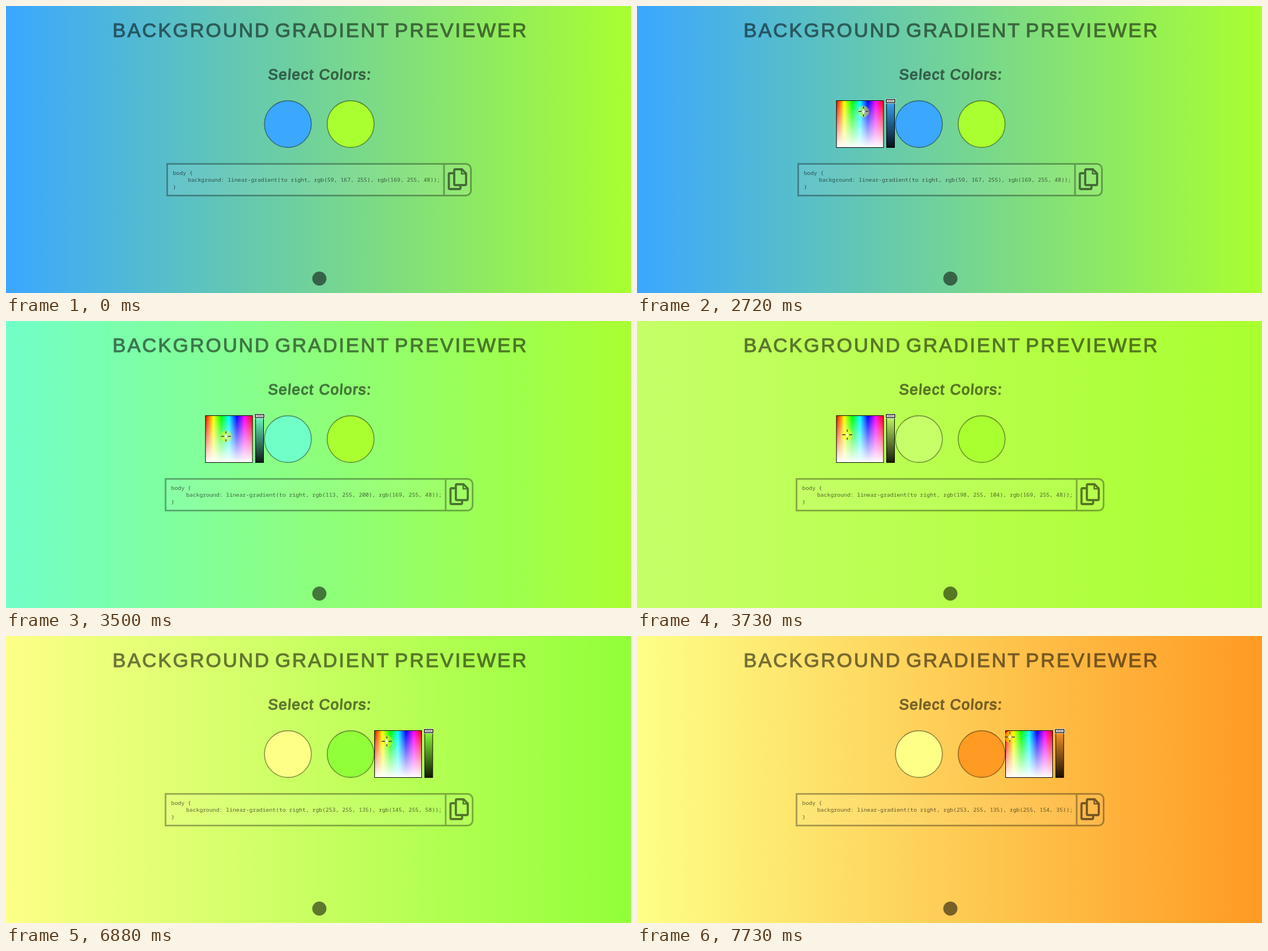
An HTML page for the animation above (8000 ms loop, 1103 by 508 pixels).

```html
<!DOCTYPE html>
<html lang="en">
<head>
<meta charset="utf-8">
<title>Background Gradient Previewer</title>
<style>
html, body { margin: 0; width: 1103px; height: 508px; overflow: hidden; }
svg { display: block; }
.heading { font-family: "Liberation Sans", Arial, sans-serif; font-kerning: none; fill: #000; stroke: #000; stroke-linejoin: round; opacity: .53; }
.title { font-size: 35px; letter-spacing: 2.8px; stroke-width: 1.1px; }
.subtitle { font-size: 26px; letter-spacing: 1.5px; stroke-width: 1.4px; }
.code { font: 9.77px "Noto Sans Mono", "DejaVu Sans Mono", monospace; fill-opacity: .6; white-space: pre; }
.frame { fill: none; stroke: #000; stroke-width: 3px; opacity: .32; }
.icon { fill: none; stroke: #000; stroke-width: 3.8px; opacity: .53; }
.swatch { stroke: #000; stroke-opacity: .42; stroke-width: 1.6px; }
.halo { fill: #ff0; fill-opacity: .45; }
.light { fill: none; stroke: #fff; stroke-width: 3px; }
.dark { fill: none; stroke: #111; stroke-width: 1.3px; }
.pointer { fill: #fff; stroke: #000; stroke-width: 1px; stroke-linejoin: round; }
</style>
</head>
<body>
<svg id="stage" width="1103" height="508" viewBox="0 0 1103 508">
  <defs>
    <linearGradient id="hues"></linearGradient>
    <linearGradient id="fade" x2="0" y2="1">
      <stop stop-color="#fff" stop-opacity="0"/><stop offset="1" stop-color="#fff"/>
    </linearGradient>
    <linearGradient id="shade" x2="0" y2="1">
      <stop stop-opacity="0"/><stop offset="1" stop-opacity=".9"/>
    </linearGradient>
  </defs>

  <g class="heading title">
    <text x="188" y="55">BACKGROUND</text>
    <text x="475" y="55">GRADIENT</text>
    <text x="686" y="55">PREVIEWER</text>
  </g>
  <text class="heading subtitle" transform="translate(462 130) skewX(-4)">Select Colors:</text>

  <circle id="left" class="swatch" cx="497.5" cy="209" r="41.4"/>
  <circle id="right" class="swatch" cx="608.2" cy="209" r="41.4"/>

  <path id="panel" fill="#fff" fill-opacity=".07"/>
  <g class="frame"><path id="border"/><path id="divider"/></g>
  <g id="code" class="code">
    <text y="299">body {</text>
    <text id="rule" x="26.4" y="311"></text>
    <text y="324">}</text>
  </g>
  <g id="copy" class="icon">
    <path d="M-3.5 289H8L15.5 296.5V315a2 2 0 0 1-2 2H-3.5a2 2 0 0 1-2-2V291a2 2 0 0 1 2-2Z"/>
    <path d="M7.5 289V297H15.5" stroke-width="2.5"/>
    <path d="M-7 296H-13a2 2 0 0 0-2 2V322a2 2 0 0 0 2 2H3.5a2 2 0 0 0 2-2V319"/>
  </g>
  <circle cx="553" cy="482.5" r="12.5" opacity=".53"/>

  <g id="picker">
    <rect x="352" y="167.5" width="83" height="83" fill="url(#hues)"/>
    <rect x="352" y="167.5" width="83" height="83" fill="url(#fade)" stroke="#000"/>
    <rect id="slider" x="440.5" y="167.5" width="14" height="83"/>
    <rect x="440.5" y="167.5" width="14" height="83" fill="url(#shade)" stroke="#000"/>
    <rect x="438.5" y="164" width="18" height="8.5" fill="#fff"/>
    <rect x="440" y="165.5" width="15" height="5.5" fill="#fff" stroke="#000" stroke-width="1.4"/>
    <path d="M442 168.2H453" stroke="#333"/>
  </g>
  <g id="mark">
    <circle id="halo" class="halo" r="10"/>
    <g id="plus">
      <path class="light" d="M-8 0H8M0-8V8"/>
      <path class="dark" d="M-7 0H7M0-7V7"/>
    </g>
    <g id="aim">
      <path d="M-9 0H9M0-9V9" stroke="#fff" stroke-width="1.4"/>
      <path class="dark" d="M-9 0H-3M3 0H9M0-9V-5M0 5V9"/>
    </g>
  </g>

  <g id="pointer" class="pointer">
    <path id="arrow" d="M0 0V16L4 12.5L6.5 18.5L9 17.5L6.5 11.5H11.5Z"/>
    <path id="hand" d="M-1.5 1.2Q0-.7 1.5 1.2V8Q3.3 6.6 4.4 8.2Q6.2 7.2 7.3 9Q9.7 8.4 9.8 11V14.5L8 19.5H-.5L-4.7 13Q-5.2 10.7-3.2 11L-1.5 12.5ZM1.5 8V11M4.4 8.5V11.5M7.3 9.5V12"/>
    <path id="cross" class="dark" d="M-9 0H9M0-9V9"/>
  </g>
</svg>
<script>
const $ = id => document.getElementById(id);
const LOOP = 8000, PICKER_X = 352, PICKER_Y = 167.5, PICKER_SIZE = 83, RIGHT_SHIFT = 298.5;

// The picture only refreshes at these moments: first, last, count.
const runs = [
  [0, 0, 1], [230, 380, 3], [540, 620, 2], [760, 1480, 10], [1720, 1720, 1], [2180, 2500, 5],
  [2650, 2720, 2], [2880, 3120, 4], [3350, 3730, 6], [3970, 3970, 1], [4190, 4370, 3],
  [4910, 4910, 1], [5060, 5140, 2], [5290, 5530, 4], [5760, 5850, 2], [6080, 6880, 11],
  [7110, 7360, 4], [7500, 7500, 1], [7730, 7730, 1]
];
const ticks = runs.flatMap(([a, b, n]) =>
  Array.from({ length: n }, (_, i) => n > 1 ? a + (b - a) * i / (n - 1) : a));

function toHsv([r, g, b]) {
  const max = Math.max(r, g, b), d = max - Math.min(r, g, b);
  const h = max === r ? (g - b) / d : max === g ? 2 + (b - r) / d : 4 + (r - g) / d;
  return [h * 60, d / max];
}
function toRgb([h, s]) {
  return [5, 3, 1].map(n => {
    const k = (n + h / 60) % 6;
    return Math.round(255 * (1 - s * Math.max(0, Math.min(k, 4 - k, 1))));
  });
}
const colorTrack = knots => knots.map(([t, ...rgb]) => [t, ...toHsv(rgb)]);

const leftTrack = colorTrack([
  [2720, 59, 167, 255], [2880, 78, 196, 255], [3040, 112, 229, 255], [3120, 118, 238, 255],
  [3350, 115, 255, 244], [3730, 198, 255, 104], [3970, 215, 255, 112], [4370, 253, 255, 135]
]);
const rightTrack = colorTrack([
  [6400, 169, 255, 48], [6880, 145, 255, 58], [7110, 190, 255, 50],
  [7360, 255, 172, 38], [7500, 255, 160, 36], [7730, 255, 154, 35]
]);
const pointerTrack = [
  [230, 924, 380], [380, 921, 357], [540, 880, 270], [620, 833, 181], [760, 800, 187],
  [1300, 500, 222], [1480, 484, 208], [1720, 484, 208], [2180, 470, 205], [2500, 411, 194],
  [2720, 401, 190], [4910, 366, 211], [5060, 440, 224], [5140, 531, 226], [5290, 536, 227],
  [5530, 587, 222], [5850, 587, 222], [6400, 670, 183]
];

function sample(track, t) {
  const i = track.findIndex(k => k[0] > t);
  if (i === 0) return track[0].slice(1);
  if (i < 0) return track[track.length - 1].slice(1);
  const a = track[i - 1], b = track[i], p = (t - a[0]) / (b[0] - a[0]);
  return a.slice(1).map((v, j) => v + (b[j + 1] - v) * p);
}

const set = (id, name, value) => $(id).setAttribute(name, value);
const show = (id, on) => set(id, "display", on ? "inline" : "none");
const move = (id, x, y) => set(id, "transform", `translate(${x} ${y})`);

function drawCode(from, to) {
  const text = `background: linear-gradient(to right, ${from}, ${to});`;
  const half = 268 + (text.length - 76) * 2.93;
  const l = 552.5 - half, r = 552.5 + half;
  const box = `M${l} 279.5H${r - 9}a9 9 0 0 1 9 9V326.5a9 9 0 0 1-9 9H${l}Z`;
  $("rule").textContent = text;
  set("panel", "d", box);
  set("border", "d", box);
  set("divider", "d", `M${r - 47.5} 281V334`);
  move("code", l + 10, 0);
  move("copy", r - 24, 0);
}

function drawPicker(t, hsv, color, second) {
  const open = t >= 1720, shift = second ? RIGHT_SHIFT : 0;
  const dragging = t >= 2720 && t < 4910 || t >= 6400;
  show("picker", open);
  show("mark", open);
  move("picker", shift, 0);
  set("slider", "fill", color);
  move("mark", PICKER_X + shift + hsv[0] / 360 * PICKER_SIZE, PICKER_Y + (1 - hsv[1]) * PICKER_SIZE);
  show("halo", dragging);
  show("aim", dragging);
  show("plus", !dragging);
  return dragging;
}

function drawPointer(t, dragging, second) {
  const [x, y] = sample(pointerTrack, t);
  const near = cx => Math.hypot(x - cx, y - 209) < 44;
  const pickerX = PICKER_X + (second ? RIGHT_SHIFT : 0);
  const hand = near(497.5) || near(608.2);
  const cross = !hand && t >= 1720 && x > pickerX && x < pickerX + PICKER_SIZE;
  const parked = t >= 4910 && t < 5060;
  show("pointer", t >= 230 && !dragging && !parked);
  show("hand", hand);
  show("cross", cross);
  show("arrow", !hand && !cross);
  move("pointer", x, y);
}

function render(time) {
  const t = ticks.findLast(k => k <= time % LOOP);
  const second = t >= 5760;
  const hsv = [sample(leftTrack, t), sample(rightTrack, t)];
  const [from, to] = hsv.map(c => `rgb(${toRgb(c).join(", ")})`);
  $("stage").style.background = `linear-gradient(to right, ${from}, ${to})`;
  set("left", "fill", from);
  set("right", "fill", to);
  drawCode(from, to);
  const dragging = drawPicker(t, hsv[+second], second ? to : from, second);
  drawPointer(t, dragging, second);
}

$("hues").innerHTML = [0, 1, 2, 3, 4, 5, 6].map(i =>
  `<stop offset="${i / 6}" stop-color="hsl(${i * 60} 100% 50%)"/>`).join("");

const start = performance.now();
function loop() {
  render(performance.now() - start);
  requestAnimationFrame(loop);
}
loop();
</script>
</body>
</html>
```
